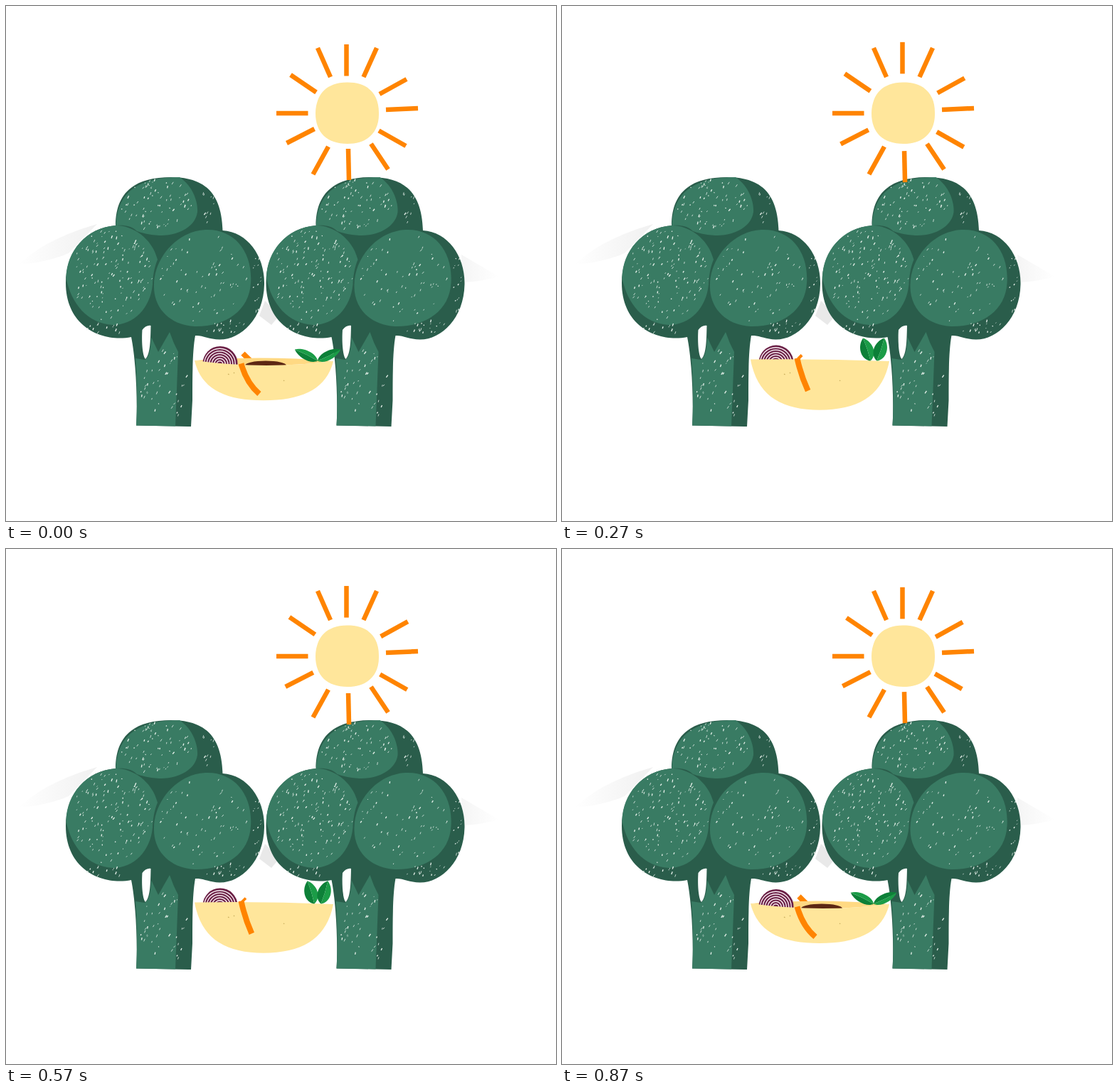
These frames come from a looping animation (773x725 px, 900 ms). An HTML page:

```html
<!DOCTYPE html>
<html lang="en">
<head>
<meta charset="utf-8">
<title>Broccoli hammock</title>
<style>
  html, body { margin: 0; width: 100%; height: 100%; overflow: hidden; background: #fff; }
  svg { display: block; width: 100vw; height: 100vh; }
  .light { fill: #397b63; }
  .dark { fill: #2a5d4b; }
  .cream { fill: #ffe69b; }
  .orange { fill: none; stroke: #ff8400; }
  .speck { fill: none; stroke: #e9f2ec; }
  .leaf-light { fill: #1b9c47; }
  .leaf-dark { fill: #0d8038; }
</style>
</head>
<body>
<svg viewBox="0 0 773 725" preserveAspectRatio="none">
  <defs>
    <linearGradient id="fadeL" x1="1" x2="0"><stop stop-color="#f0f0f0"/><stop offset="1" stop-color="#fff"/></linearGradient>
    <linearGradient id="fadeR"><stop stop-color="#f5f5f5"/><stop offset="1" stop-color="#fff"/></linearGradient>
    <clipPath id="dome"><path d="M270 470H332V507H270Z"/></clipPath>
    <g id="tree">
      <path class="dark" d="M154 312C153 263 180 241 232 241C280 241 303 264 304.500 316C340 318 364 353 363 392C362 440 330 470 300 469.500C285 469 275 463 266 464C262 485 262 520 262 555L260 592L183 590.500C185 560 183 500 176 466C136 474 84 452 84 390C84 345 113 312 154 309Z"/>
      <path class="light" d="M154.500 309C156 263 185 241 244 241C262 253 270 275 269 290C266 312 240 324 215 323C200 322 190 319 184 317C176 309 165 308 154.500 309Z"/>
      <path class="light" d="M154 309C175 308 205 325 213 357C208 368 206 385 206 392C203 425 180 449 150 449C115 447 92 420 84.500 383C85 345 113 312 154 309Z"/>
      <path class="light" d="M280 315C321 313 347 346 344 390C342 429 308 452 265 451C230 449 207 425 208 393C208 355 240 317 280 315Z"/>
      <path class="light" d="M204 466L214 487L230 459Q235 474 242 487Q240 540 238 591.500L183 590.500C185 560 184 520 182 496L195 498C202 495 204 478 204 466Z"/>
      <path fill="#fff" d="M191.500 456C195 451 200 449 203.500 450C203 470 203 490 196 497C191.500 492 190.500 470 191.500 456Z"/>
      <path class="speck" id="fine" stroke-width=".8"/>
      <path class="speck" id="bold" stroke-width="1.300"/>
    </g>
  </defs>

  <path fill="url(#fadeL)" d="M128 307C90 318 48 335 18 364C45 362 70 356 88 348Z"/>
  <path fill="url(#fadeR)" d="M640 350L693 381Q668 388 642 389Z"/>
  <path fill="#e9e9e9" d="M364 415L384 436L373 449L356 436Z"/>

  <path class="cream" d="M479 107.500C508 107 524 123 524 150C525 178 508 194 480 194C451 194 435 178 435 151C436 123 451 108 479 107.500Z"/>
  <use href="#tree"/>
  <use href="#tree" x="281.500"/>
  <g id="rays" class="orange" stroke-width="6.500"></g>

  <path id="carrotBack" class="orange" stroke-width="7.500"/>
  <path id="inside" fill="#ffd983"/>
  <ellipse id="bean" cx="365" cy="506" rx="29" ry="6.500" fill="#5c2713"/>
  <g id="onion" clip-path="url(#dome)"></g>
  <path id="bowl" class="cream"/>
  <path stroke="#c9ac5c" stroke-width="1.200" d="M312 518l1.500 1M320 516l1 1M390 527l1.200 .8"/>
  <path id="carrot" class="orange" stroke-width="8"/>
  <g id="leafL"><path class="leaf-dark"/><path class="leaf-light"/></g>
  <g id="leafR"><path class="leaf-dark"/><path class="leaf-light"/></g>
</svg>
<script>
const $ = id => document.getElementById(id);
const LOOP = 900;

function add(parent, tag, attrs) {
  const el = document.createElementNS('http://www.w3.org/2000/svg', tag);
  for (const k in attrs) el.setAttribute(k, attrs[k]);
  return parent.appendChild(el);
}

// Sun rays, outer end to inner end, clockwise from the top
const rays = [
  [478.5, 54, 478.5, 98.5], [521, 59, 502.5, 100], [563, 103, 525, 124], [579, 144, 534, 146],
  [562, 197, 524, 175.5], [537, 230, 513, 194], [482, 245, 481, 201], [431.5, 237, 453, 198],
  [394.5, 193, 433.5, 173], [380, 151, 424.5, 151], [400, 97, 436, 121.5], [438, 59, 456, 100]
].map(([x1, y1, x2, y2]) => {
  const len = Math.hypot(x1 - x2, y1 - y2);
  return { el: add($('rays'), 'line', { x1, y1, x2, y2 }), ux: (x1 - x2) / len, uy: (y1 - y2) / len };
});

// Onion: dark dome with pale rings
add($('onion'), 'circle', { cx: 301, cy: 501.5, r: 24.5, fill: '#6a1f45' });
for (let r = 21.8; r > 2; r -= 3.5)
  add($('onion'), 'circle', { cx: 300.5, cy: 502, r, fill: 'none', stroke: '#f6e9ef', 'stroke-width': 1.4 });

// Chalky specks: centre x, centre y, radius x, radius y, count
let seed = 7;
const rnd = () => (seed = (seed * 16807) % 2147483647) / 2147483647;
const specks = { fine: '', bold: '' };
[
  [212, 282, 50, 36, 70], [148, 380, 57, 64, 135], [276, 384, 62, 62, 65],
  [352, 392, 6, 45, 15], [305, 452, 32, 11, 18], [140, 456, 36, 7, 13],
  [284, 283, 13, 25, 10], [222, 535, 34, 52, 42]
].forEach(([cx, cy, rx, ry, n]) => {
  while (n--) {
    const a = rnd() * 6.283, d = Math.sqrt(rnd()), len = 1 + rnd() * 3.2, tilt = 0.15 + rnd() * 0.6;
    specks[rnd() < 0.35 ? 'bold' : 'fine'] +=
      `M${(cx + rx * d * Math.cos(a)).toFixed(1)} ${(cy + ry * d * Math.sin(a)).toFixed(1)}` +
      `l${(len * Math.sin(tilt)).toFixed(1)} ${(-len * Math.cos(tilt)).toFixed(1)}`;
  }
});

function setPath(el, d) { el.setAttribute('d', d); }

for (const k in specks) setPath($(k), specks[k]);

function drawLeaf(id, side, open) {
  const g = $(id), len = 33 + 3 * open, w = 12.5 - 4 * open * open;
  const half = s => `M0 0C${s * w} ${-len * 0.16} ${s * w} ${-len * 0.72} 0 ${-len}Q1.5 ${-len / 2} 0 0Z`;
  g.setAttribute('transform',
    `translate(${438 + side * 8 * (1 - open) ** 2} 499.5) rotate(${side * (2 + 62 * open)})`);
  setPath(g.children[0], half(-1));
  setPath(g.children[1], half(1));
}

function draw(t) {
  // open: 1 = swung back showing the inside, 0 = swung forward
  const open = (1 - Math.cos(2 * Math.PI * (t - 425) / LOOP)) / 2;
  const push = 3.5 * Math.sin(Math.PI * t / 450) ** 2;

  rays.forEach((ray, i) => {
    if (i % 2 === 0) ray.el.setAttribute('transform', `translate(${ray.ux * push} ${ray.uy * push})`);
  });

  const lx = 265, ly = 497 + 2 * open, rx = 460, ry = 500;
  const front = 494.5 + 11.5 * open, back = 500 - 4.5 * open;
  const bottom = 567 + 12.8 * open - 24.8 * open * open;
  const ctrl = y => 2 * y - (ly + ry) / 2;
  const side = 499 + (bottom - 499) * 0.69;
  setPath($('bowl'), `M${lx} ${ly}C274 ${side} 306 ${bottom} 362 ${bottom}` +
    `S451 ${side} ${rx} ${ry}Q362 ${ctrl(front)} ${lx} ${ly}Z`);
  setPath($('inside'), back < front
    ? `M${lx} ${ly}Q362 ${ctrl(back)} ${rx} ${ry}Q362 ${ctrl(front)} ${lx} ${ly}Z` : '');
  $('onion').setAttribute('transform', `translate(0 ${2 * open})`);
  $('bean').style.visibility = back < front ? 'visible' : 'hidden';

  const y0 = 493 + 10.5 * open, x1 = 342 + 14 * open, y1 = 540 + 6 * open;
  setPath($('carrot'), `M330.5 ${y0}Q${335 + 3 * open} ${(y0 + y1) / 2 + 6 * open} ${x1} ${y1}`);
  const tip = 494 - 5 * open;
  setPath($('carrotBack'), `M333 ${tip}l${11 * open} ${11 * open}`);

  drawLeaf('leafL', -1, open);
  drawLeaf('leafR', 1, open);
}

const start = performance.now();
function tick() {
  draw((performance.now() - start) % LOOP);
  requestAnimationFrame(tick);
}
draw(0);
requestAnimationFrame(tick);
</script>
</body>
</html>
```
